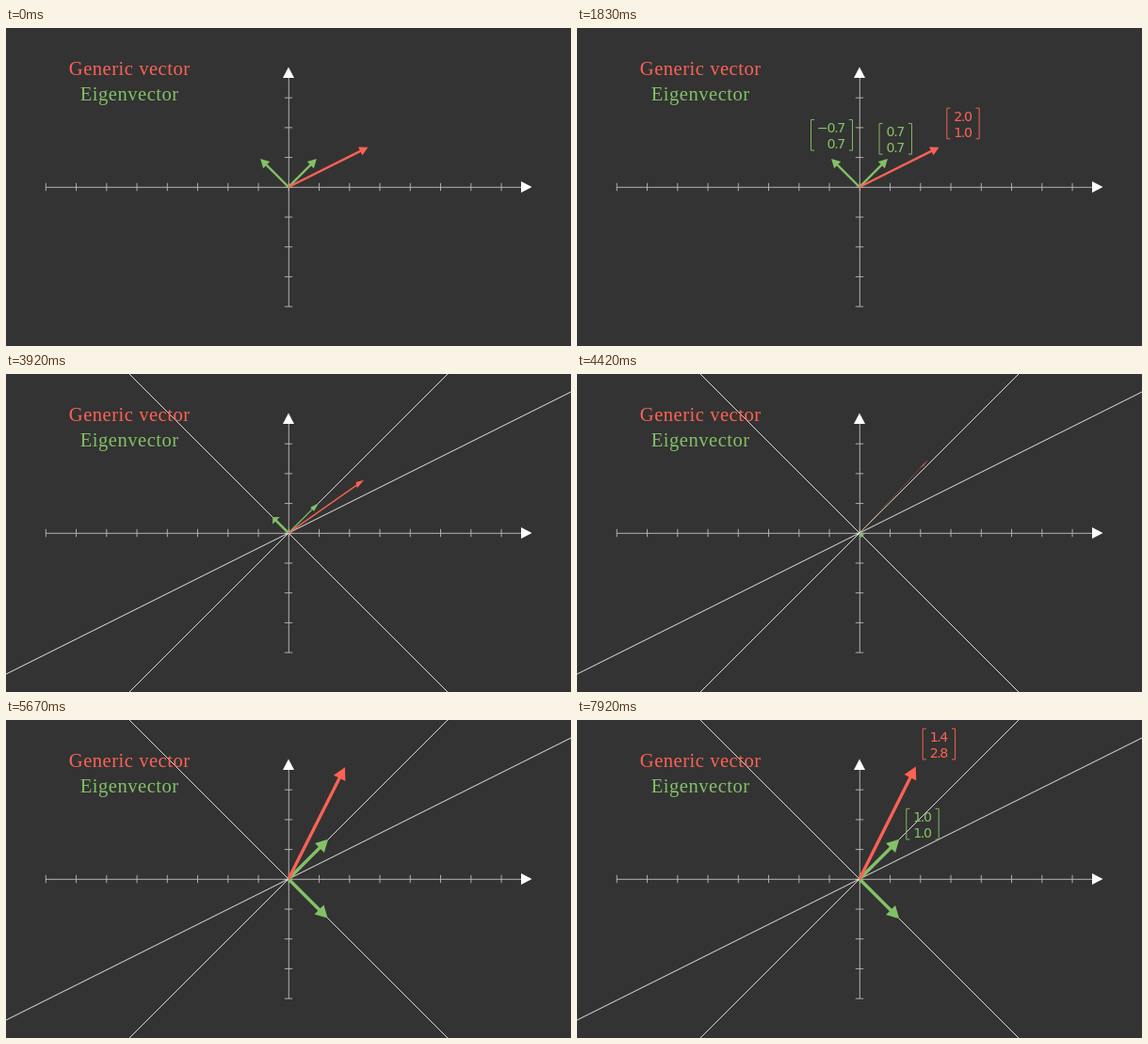
These frames come from a looping animation (600 px wide and 338 px high, 8 s). An HTML page with a canvas:

```html
<!DOCTYPE html>
<html lang="en">
<head>
<meta charset="utf-8">
<title>Eigenvectors</title>
<style>
  html, body { margin: 0; width: 100%; height: 100%; overflow: hidden; background: #333; }
  canvas { display: block; }
</style>
</head>
<body>
<canvas id="stage" width="600" height="338"></canvas>
<script>
const ctx = document.getElementById('stage').getContext('2d');
const W = 600, H = 338, CX = W / 2, CY = H / 2;
const UNIT = H / 8;
const LOOP = 8000;
const RED = '#fc6255', GREEN = '#83c167', GREY = '#bbb';
const R = Math.SQRT1_2;

const vectors = [
  { x: -R, y: R, color: GREEN },
  { x: R, y: R, color: GREEN },
  { x: 2, y: 1, color: RED }
];

// Bracket corners: left, right, top
const startLabels = [
  { left: 248.5, right: 292.5, top: 97.5, rows: ['−0.7', '0.7'], color: GREEN },
  { left: 321, right: 355.5, top: 101.5, rows: ['0.7', '0.7'], color: GREEN },
  { left: 392.8, right: 427.2, top: 85.2, rows: ['2.0', '1.0'], color: RED }
];
const redResult = { left: 367.2, right: 401.6, top: 9.3, rows: ['1.4', '2.8'], color: RED };
const greenResult = { left: 349.8, right: 384.2, top: 94.3, rows: ['1.0', '1.0'], color: GREEN };

// Quintic ease between two times
function ease(time, start, duration) {
  const t = Math.min(1, Math.max(0, (time - start) / duration));
  const u = 1 - t;
  return t ** 3 * (10 * u * u + 5 * t * u + t * t);
}

function stroke(points, color, width) {
  ctx.beginPath();
  points.forEach(([x, y]) => ctx.lineTo(x, y));
  ctx.strokeStyle = color;
  ctx.lineWidth = width;
  ctx.stroke();
}

function polygon(points, color) {
  ctx.beginPath();
  points.forEach(([x, y]) => ctx.lineTo(x, y));
  ctx.closePath();
  ctx.fillStyle = color;
  ctx.fill();
}

function drawAxes() {
  const x0 = CX + 0.3, y0 = CY + 0.3;
  const stepX = 32.25, stepY = 31.7, half = 4.2;
  stroke([[42, y0], [548, y0]], GREY, 0.95);
  stroke([[x0, 296], [x0, 52]], GREY, 0.95);
  for (let k = -8; k <= 7; k++) {
    const x = x0 + k * stepX;
    stroke([[x, CY - half], [x, CY + half]], GREY, 0.9);
  }
  for (let k = -3; k <= 4; k++) {
    const y = y0 + k * stepY;
    stroke([[CX - half, y], [CX + half, y]], GREY, 0.9);
  }
  polygon([[558.5, CY], [547, CY - 6], [547, CY + 6]], '#fff');
  polygon([[CX, 41.5], [CX - 6, 53], [CX + 6, 53]], '#fff');
}

function drawSpans(progress) {
  if (progress <= 0) return;
  const reach = 10 * UNIT;
  for (const { x, y } of vectors) {
    const size = Math.hypot(x, y);
    const at = s => [CX + s * x / size, CY - s * y / size];
    stroke([at(-reach), at(reach * (2 * progress - 1))], '#fff', 0.85);
  }
}

function drawLegend() {
  ctx.font = '20.6px "Liberation Serif", serif';
  ctx.letterSpacing = '0.5px';
  ctx.textAlign = 'center';
  ctx.fillStyle = RED;
  ctx.fillText('Generic vector', 131.2, 49.6);
  ctx.fillStyle = GREEN;
  ctx.fillText('Eigenvector', 131.2, 76.9);
}

// Blend from the identity to the matrix [[0, √2], [√2, 0]]
function drawArrows(progress) {
  const diagonal = 1 - progress, cross = Math.SQRT2 * progress;
  const head = 9.2, wing = 5, shaft = 1.2;
  for (const { x, y, color } of vectors) {
    const length = Math.hypot(x, y) * UNIT;
    ctx.save();
    ctx.translate(CX, CY);
    ctx.transform(diagonal, -cross, -cross, diagonal, 0, 0);
    ctx.rotate(-Math.atan2(y, x));
    polygon([
      [0, -shaft], [length - head, -shaft], [length - head, -wing], [length, 0],
      [length - head, wing], [length - head, shaft], [0, shaft]
    ], color);
    ctx.restore();
  }
}

function drawLabel({ left, right, top, rows, color }, alpha) {
  if (alpha <= 0) return;
  const bottom = top + 32.6, lip = 3.6;
  ctx.globalAlpha = alpha;
  stroke([[left + lip, top], [left, top], [left, bottom], [left + lip, bottom]], color, 0.95);
  stroke([[right - lip, top], [right, top], [right, bottom], [right - lip, bottom]], color, 0.95);
  ctx.font = '14.2px "DejaVu Sans", sans-serif';
  ctx.letterSpacing = '-1.4px';
  ctx.textAlign = 'right';
  ctx.fillStyle = color;
  rows.forEach((text, i) => ctx.fillText(text, right - 8.6, top + 13.8 + i * 17));
  ctx.globalAlpha = 1;
}

function draw(time) {
  ctx.fillStyle = '#333';
  ctx.fillRect(0, 0, W, H);
  const swap = ease(time, 1980, 1000);
  const startAlpha = ease(time, -20, 1000) * (1 - swap);
  drawAxes();
  drawSpans(swap);
  drawLegend();
  drawArrows(ease(time, 2980, 3000));
  startLabels.forEach(label => drawLabel(label, startAlpha));
  drawLabel(redResult, ease(time, 5980, 1000));
  drawLabel(greenResult, ease(time, 6980, 1000));
}

const began = performance.now();
function frame() {
  draw((performance.now() - began) % LOOP);
  requestAnimationFrame(frame);
}
frame();
</script>
</body>
</html>
```
